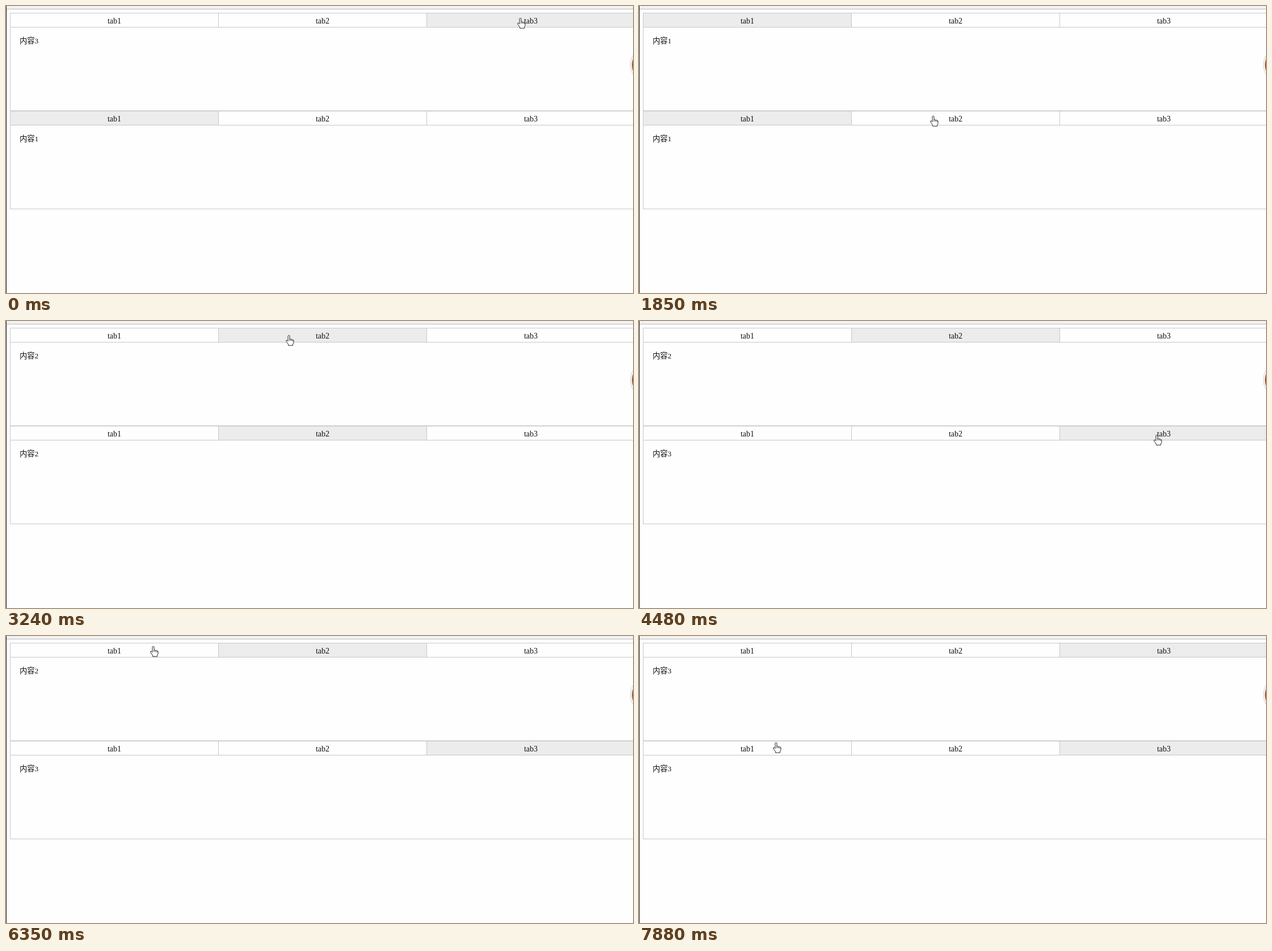
Write an HTML page that moves like this. It is 1105 by 507 pixels and loops after 8 s.

```html
<!DOCTYPE html>
<html lang="zh">
<head>
<meta charset="utf-8">
<style>
  html, body { margin: 0; width: 100%; height: 100%; overflow: hidden; background: #fefefe; }
  svg { display: block; }
  text { font: 13.3px "Liberation Serif", "Noto Sans CJK SC", "Noto Sans CJK", serif; fill: #111; }
  .label { font-size: 14px; text-anchor: middle; }
  .line { fill: #c8c8c8; }
  .active { fill: #ececec; }
  .cursor { fill: #fff; stroke: #22222c; stroke-linejoin: round; }
</style>
</head>
<body>
<svg id="stage" width="1105" height="507" viewBox="0 0 1105 507">
  <rect width="1105" height="5" fill="#f1f2f1"/>
  <rect y="5" width="1105" height="1" fill="#bcbebc"/>
  <rect width="1" height="507" fill="#222"/>
  <g id="panels"></g>
  <circle cx="1135" cy="104" r="34.5" fill="#fff" stroke="#ccc"/>
  <circle cx="1135" cy="104" r="32" fill="#a8542a"/>
  <g id="pointer">
    <path id="hand" class="cursor" transform="translate(-.5 -.8)" d="M-1.5 1Q0-.8 1.5 1V7Q3 5.6 4.2 7.4Q5.8 6.4 6.6 8.2Q8.5 7.6 8.5 9.8V13L7 16V18H-1V16L-4.6 11Q-5.6 8.4-3.4 8.6L-1.5 10.5ZM1.5 7V10M4.2 7.5V10M6.6 8.2V10.5"/>
    <path id="arrow" class="cursor" d="M.5.5V13L3.3 10.4L5.4 15.4L7.4 14.5L5.2 9.7H9.3Z"/>
  </g>
</svg>
<script>
const LOOP = 8000;
const SAMPLE = 132; // approximate interval between pointer jumps
const TAB_WIDTH = 367;
const TAB_HEIGHT = 25;
const LEFT = 7;
const PANEL_TOPS = [12, 185];
const PANEL_HEIGHT = 173;

const clicks = [
  { time: 0, panel: 0, tab: 3 },
  { time: 0, panel: 1, tab: 1 },
  { time: 1060, panel: 0, tab: 1 },
  { time: 2130, panel: 1, tab: 2 },
  { time: 3240, panel: 0, tab: 2 },
  { time: 4480, panel: 1, tab: 3 },
  { time: 6660, panel: 0, tab: 1 },
  { time: 7203, panel: 0, tab: 3 }
];

// The pointer follows one curve per move, pulled towards "via".
const home = [907, 22];
const moves = [
  { start: 130, end: 670, via: [480, 55], to: [265, 28] },
  { start: 1340, end: 1850, via: [430, 260], to: [519, 195] },
  { start: 2400, end: 2790, via: [123, 100], to: [499, 26] },
  { start: 3520, end: 4480, via: [800, 290], to: [913, 202] },
  { start: 4600, end: 5230, via: [550, 252], to: [196, 200] },
  { start: 5500, end: 5650, via: [1069, -112], to: [733, 25] },
  { start: 5930, end: 6350, via: [500, 24], to: [260, 19] },
  { start: 6660, end: 7203, via: [570, 22], to: [880, 26] },
  { start: 7339, end: 7610, via: [830, 60], to: [738, 107] },
  { start: 7730, end: 7880, via: [490, 150], to: [242, 189] }
];

const byId = id => document.getElementById(id);

function add(parent, tag, attributes, text = "") {
  const node = document.createElementNS("http://www.w3.org/2000/svg", tag);
  for (const name in attributes) node.setAttribute(name, attributes[name]);
  node.textContent = text;
  return parent.appendChild(node);
}

function buildPanel(top) {
  const group = add(byId("panels"), "g", {});
  const line = (x, y, width, height) => add(group, "rect", { class: "line", x, y, width, height });
  const highlight = add(group, "rect", { class: "active", y: top + 1, width: TAB_WIDTH - 1, height: TAB_HEIGHT - 1 });
  for (const y of [0, TAB_HEIGHT, PANEL_HEIGHT]) line(LEFT, top + y, 1098, 1);
  line(LEFT, top, 1, PANEL_HEIGHT);
  for (let i = 0; i < 3; i++) {
    const x = LEFT + i * TAB_WIDTH;
    if (i) line(x, top, 1, TAB_HEIGHT);
    add(group, "text", { class: "label", x: x + TAB_WIDTH / 2 + 0.5, y: top + 18.5 }, "tab" + (i + 1));
  }
  const content = add(group, "text", { x: 24, y: top + 53.7 });
  return { highlight, content };
}

const panels = PANEL_TOPS.map(buildPanel);
// The shared border of the two panels is slightly thicker.
add(byId("panels"), "rect", { class: "line", x: LEFT, y: 184.5, width: 1098, height: 1.7 });

function pointerAt(time) {
  const index = moves.findLastIndex(move => move.start <= time);
  if (index < 0) return home;
  const { start, end, via, to } = moves[index];
  const from = index ? moves[index - 1].to : home;
  const jumps = Math.round((end - start) / SAMPLE);
  const step = Math.min(jumps, Math.floor((time - start) / (end - start) * jumps + 1e-6));
  const u = (step + 1) / (jumps + 1);
  return from.map((a, i) => (1 - u) ** 2 * a + 2 * u * (1 - u) * via[i] + u * u * to[i]);
}

function render(time) {
  panels.forEach(({ highlight, content }, panel) => {
    const { tab } = clicks.findLast(click => click.panel === panel && click.time <= time);
    highlight.setAttribute("x", LEFT + 1 + (tab - 1) * TAB_WIDTH);
    content.textContent = "内容" + tab;
  });
  const [x, y] = pointerAt(time).map(Math.round);
  const overTab = PANEL_TOPS.some(top => y >= top && y <= top + TAB_HEIGHT);
  byId("pointer").setAttribute("transform", `translate(${x} ${y})`);
  byId("hand").style.display = overTab ? "" : "none";
  byId("arrow").style.display = overTab ? "none" : "";
}

const origin = performance.now();
function tick() {
  render((performance.now() - origin) % LOOP);
  requestAnimationFrame(tick);
}
tick();
</script>
</body>
</html>
```
